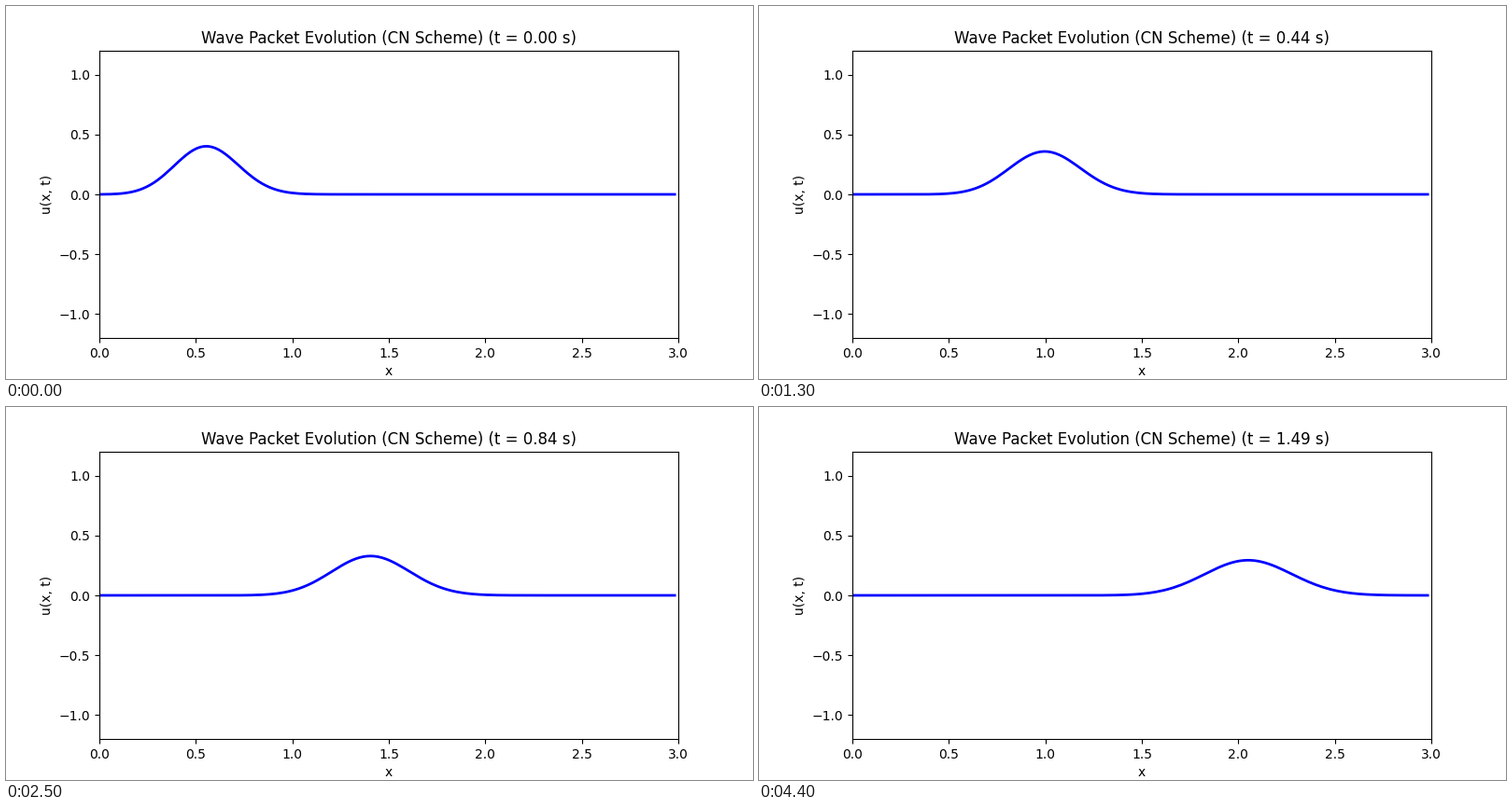
Recreate the animation shown at these times as a matplotlib script. Size 800x400 px, loop 4450 ms.

```python
import numpy as np
import matplotlib.pyplot as plt
from matplotlib.animation import FuncAnimation

LENGTH = 3.0
CELLS = 160
FRAMES = 89
dx = LENGTH / CELLS
dt = 0.9 * dx

SPEED = 1.0065      # drift of the packet
SPREAD = 0.0160     # growth of the variance per second
CENTRE = 0.5
VAR0 = 0.030
SCALE = 0.762

x = np.arange(CELLS) * dx


def packet(t):
    """Profile x * Gaussian, carried along and widened by diffusion."""
    var = VAR0 + SPREAD * t
    ratio = VAR0 / var
    d = x - SPEED * t - CENTRE
    return SCALE * np.sqrt(ratio) * (CENTRE + ratio * d) * np.exp(-d**2 / (2 * var))


fig, ax = plt.subplots(figsize=(8, 4), dpi=100)
line, = ax.plot(x, packet(0), color="blue", lw=2)
ax.set_xlim(0, LENGTH)
ax.set_ylim(-1.2, 1.2)
ax.set_xlabel("x")
ax.set_ylabel("u(x, t)")
title = ax.set_title("")


def update(n):
    t = n * dt
    line.set_ydata(packet(t))
    title.set_text(f"Wave Packet Evolution (CN Scheme) (t = {t:.2f} s)")
    return line, title


anim = FuncAnimation(fig, update, frames=FRAMES, interval=50,
                     repeat=True, repeat_delay=0, blit=False)
plt.show()
```
